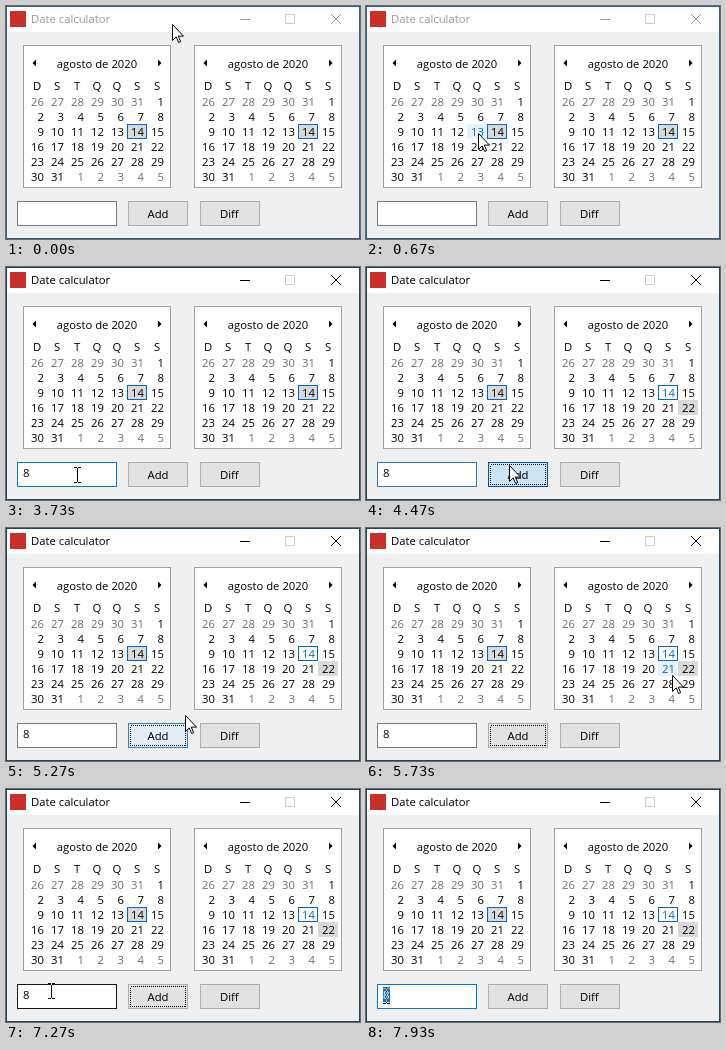
Animation of 354 by 233 pixels, one loop 8 s. Source, as an HTML page:

```html
<!DOCTYPE html>
<html lang="en">
<head>
<meta charset="utf-8">
<title>Date calculator</title>
<style>
  html, body { margin: 0; width: 100%; height: 100%; overflow: hidden; background: #fff; }
  svg { display: block; width: 354px; height: 233px; isolation: isolate; }
  text { font: 11.3px "Open Sans", "Noto Sans", sans-serif; white-space: pre; }
  .crisp { shape-rendering: crispEdges; }
  #beam { mix-blend-mode: difference; }
</style>
</head>
<body>
<svg id="stage" viewBox="0 0 354 233"></svg>
<script>
const NS = "http://www.w3.org/2000/svg";
const LOOP = 8000, TICK = 200 / 3;
const stage = document.getElementById("stage");

function add(tag, attrs, text) {
  const el = document.createElementNS(NS, tag);
  for (const key in attrs) el.setAttribute(key, attrs[key]);
  if (text !== undefined) el.textContent = text;
  return stage.appendChild(el);
}
const box = (x, y, width, height, fill, stroke = "none") =>
  add("rect", { x, y, width, height, fill, stroke });
const label = (x, y, text, anchor = "start", fill = "#000") =>
  add("text", { x, y, "text-anchor": anchor, fill }, text);
const paint = (el, fill, stroke) => {
  el.setAttribute("fill", fill);
  if (stroke) el.setAttribute("stroke", stroke);
};
const show = (el, on) => el.setAttribute("visibility", on ? "visible" : "hidden");

const ramp = (t, from, to) => Math.min(1, Math.max(0, (t - from) / (to - from)));
function mix(a, b, p) {
  const part = (c, i) => parseInt(c.slice(i, i + 2), 16);
  return "rgb(" + [1, 3, 5].map(i => Math.round(part(a, i) + (part(b, i) - part(a, i)) * p)) + ")";
}

// Window frame and title bar
const frame = box(.5, .5, 353, 232, "#f0f0f0");
box(1, 1, 352, 25, "#ffffff");
box(4, 5, 16, 16, "#c9302c");
const title = label(25, 17, "Date calculator");
const minimise = add("path", { d: "M234 13.5h10", fill: "none", class: "crisp" });
add("path", { d: "M279.5 8.5h9v9h-9z", fill: "none", stroke: "#cccccc" });
const closeIcon = add("path", { d: "M325 8l10 10m0-10l-10 10", fill: "none" });

// Month calendars
function makeCalendar(left) {
  box(left + .5, 39.5, 147, 142, "#ffffff", "#a0a0a0");
  add("path", { d: `M${left + 13} 53.5v7l-3.5-3.5zM${left + 135} 53.5v7l3.5-3.5z` });
  label(left + 74, 62, "agosto de 2020", "middle");
  [..."DSTQQSS"].forEach((day, i) => label(left + 14 + 20 * i, 84, day, "middle"));
  const cells = [];
  for (let i = 0; i < 42; i++) {
    const col = i % 7, row = Math.floor(i / 7);
    const x = left + 4 + 20 * col, y = 88 + 15 * row;
    const day = i < 6 ? i + 26 : i < 37 ? i - 5 : i - 36;
    const inMonth = i >= 6 && i < 37;
    const back = box(x + .5, y + .5, 19, 14, "none");
    const text = label(x + 17, y + 12, day, "end");
    cells.push({ x, y, back, text, day: inMonth ? day : 0 });
  }
  return cells;
}
const calendars = [makeCalendar(17), makeCalendar(188)];

function drawCalendar(cells, selected, pointer) {
  for (const { x, y, back, text, day } of cells) {
    const hover = pointer.x >= x && pointer.x < x + 20 && pointer.y >= y && pointer.y < y + 15;
    const chosen = day === selected, today = day === 14;
    const fill = chosen ? (hover ? "#d1e8ff" : "#d9d9d9") : hover ? "#e5f3ff" : "none";
    paint(back, fill, today ? "#0066cc" : fill);
    const blue = !chosen && (hover || today);
    paint(text, blue ? "#0066cc" : day ? "#000000" : "#6d6d6d");
  }
}

// Entry and buttons
const entry = box(11.5, 195.5, 99, 24, "#ffffff");
const selection = box(17, 198, 7, 15, "#0078d7");
const typed = label(17, 210, "8");
const caret = box(17, 198, 1, 15, "#000000");
const addButton = box(122.5, 195.5, 59, 24, "#e1e1e1");
const focusRing = add("path", {
  d: "M124.5 197.5h55v20h-55z", fill: "none", stroke: "#000", "stroke-dasharray": "1 1", class: "crisp"
});
label(152, 212, "Add", "middle");
box(194.5, 195.5, 59, 24, "#e1e1e1", "#adadad");
label(223.4, 212, "Diff", "middle");

// Pointers
const arrow = add("path", {
  d: "M-.5 .5v16l3.7-3.6 2.5 5.6 2-.9-2.5-5.5h5.3z", fill: "#fff", stroke: "#000"
});
const beam = add("path", {
  id: "beam", class: "crisp", fill: "#fff",
  d: "M0-7h1v14h-1zM-3-8h3v1h-3zM1-8h3v1h-3zM-3 7h3v1h-3zM1 7h3v1h-3z"
});

// Pointer stops: time, x, y
const route = [
  [0, 167, 18], [133, 167, 18], [666.7, 113, 127], [1000, 60, 207],
  [3667, 60, 207], [4000, 113, 214], [4333, 144, 198],
  [5133, 144, 198], [5733.3, 307, 147], [6000, 318, 141],
  [6467, 318, 141], [6733.3, 243, 159], [7333, 20, 207], [LOOP, 20, 207]
];
function pointerAt(t) {
  const i = Math.max(1, route.findIndex(stop => stop[0] >= t));
  const [t0, x0, y0] = route[i - 1], [t1, x1, y1] = route[i];
  const p = ramp(t, t0, t1);
  return { x: Math.round(x0 + (x1 - x0) * p), y: Math.round(y0 + (y1 - y0) * p) };
}

function drawEntry(t, inside) {
  const focus = t < 4300 ? ramp(t, 1000, 1333) : t < 7390 ? 1 - ramp(t, 4333, 4733) : ramp(t, 7333, 7600);
  const idle = inside && (t < 1060 || t > 7000) ? "#171717" : "#7a7a7a";
  entry.setAttribute("stroke", mix(idle, "#0078d7", focus));
  const selected = t > 7530;
  show(typed, t > 2730);
  show(selection, selected);
  paint(typed, selected ? "#ffffff" : "#000000");
  const within = (from, to) => t >= from - 1 && t < to - 1;
  show(caret, within(1333, 1867) || within(2400, 3267) || within(3800, 4333) || within(7400, 7533));
  caret.setAttribute("x", t > 2730 && t < 7000 ? 23 : 17);
}

function drawAddButton(t) {
  const hover = ramp(t, 4060, 4200) * (1 - ramp(t, 5200, 5467));
  const pressed = ramp(t, 4300, 4400) * (1 - ramp(t, 4533, 4733));
  const fill = pressed ? mix("#e5f1fb", "#cce4f7", pressed) : mix("#e1e1e1", "#e5f1fb", hover);
  const line = pressed ? mix("#0078d7", "#005499", pressed) : mix("#adadad", "#0078d7", hover);
  paint(addButton, fill, line);
  show(focusRing, t > 4330 && t < 7390);
}

function draw(t) {
  const active = t > 1060;
  const ink = active ? "#000000" : "#999999";
  frame.setAttribute("stroke", active ? "#1c4560" : "#2f628f");
  paint(title, ink);
  minimise.setAttribute("stroke", ink);
  closeIcon.setAttribute("stroke", ink);

  const pointer = pointerAt(t);
  const inside = pointer.x >= 11 && pointer.x < 111 && pointer.y >= 195 && pointer.y < 220;
  const hidden = t > 2730 && t < 3730;
  const place = `translate(${pointer.x} ${pointer.y})`;
  arrow.setAttribute("transform", place);
  beam.setAttribute("transform", place);
  show(arrow, !inside && !hidden);
  show(beam, inside && !hidden);

  drawCalendar(calendars[0], 14, pointer);
  drawCalendar(calendars[1], t > 4460 ? 22 : 14, pointer);
  drawEntry(t, inside);
  drawAddButton(t);
}

const start = performance.now();
function tick() {
  const t = (performance.now() - start) % LOOP;
  draw(Math.floor(t / TICK + .05) * TICK);
  requestAnimationFrame(tick);
}
tick();
</script>
</body>
</html>
```
